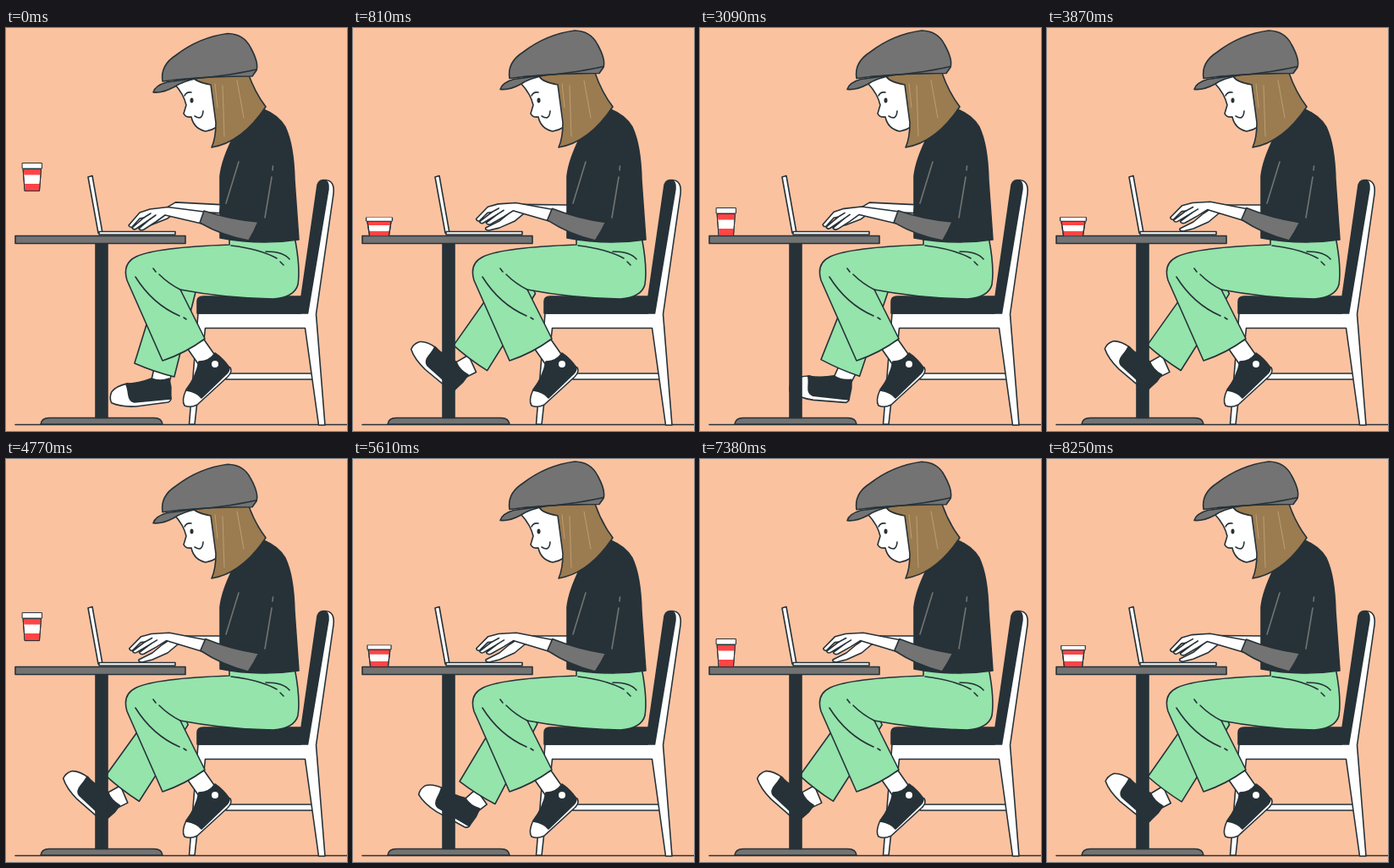
An HTML page that plays this animation: 403x476 px, repeating every 8280 ms.

```html
<!DOCTYPE html>
<html lang="en">
<head>
<meta charset="utf-8">
<title>Working at the laptop</title>
<style>
html,body{margin:0;width:100%;height:100%;overflow:hidden;background:#fbc2a0}
svg{display:block;width:100vw;height:100vh}
.ink{stroke:#263238;stroke-width:1.6;stroke-linejoin:round;stroke-linecap:round}
.thin{stroke-width:1}
.white{fill:#fff}.dark{fill:#263238}.grey{fill:#737373}.green{fill:#94e4ab}.hair{fill:#9b7b50}.red{fill:#ff4545}
.line{fill:none}.soft{fill:none;stroke:#737373}
</style>
</head>
<body>
<svg viewBox="0 0 403 476">
<rect width="403" height="476" fill="#fbc2a0"/>
<g class="ink">
  <path class="line" d="M11 468.500H403"/>

  <g id="chair">
    <path class="white" d="M261 408H362L363 415H260Z"/>
    <path class="white" d="M227 337L216.500 468H223L235.500 354.500H353.500L369.500 469H377L366.500 338L387 196Q389 180 377 179.500L348 337Z"/>
    <path class="dark" d="M367.500 189Q368 180 375 179.500Q382 180 381 190L356.500 337H226V323Q226 317 233 317H349Z"/>
  </g>

  <g id="shank">
    <g id="foot">
      <path class="white" d="M176 398L172 416L193 419L197 405Z"/>
      <path class="white" d="M144 420Q130 423 125 430Q122 437 125 443Q136 448 154 447L192 442Q196 440 195 436Z"/>
      <path class="dark" d="M142 420.500Q157 420 172 414Q182 418 193 414L195 424V438L152 442Q146 441 145 433Q144 425 142 420.500Z"/>
    </g>
    <path class="green" d="M181 302L152 396Q175 406 199 412L225 308Q210 290 181 302Z"/>
  </g>

  <g id="table">
    <path class="grey" d="M41 468Q42 460.500 51 460.500H175Q184 460.500 185 468Z"/>
    <path class="dark" d="M106 254H120V460.500H106Z"/>
    <path class="grey" d="M11 245.500H212V254.500H11Z"/>
  </g>

  <g id="frontLeg">
    <path class="white" d="M214 378L228 398L248 388L234 368Z"/>
    <path class="white" d="M228 394Q225 412 213 427Q207 440 211 446Q218 449 226 445L262 412Q268 406 265 401Z"/>
    <path class="dark" d="M229 394Q240 394 247 384Q256 390 264 401Q264 406 259 410L231 437Q226 430 213 428Q226 411 229 394Z"/>
    <circle cx="247" cy="397" r="4" fill="#fff" stroke="none"/>
    <path class="green" d="M264 250L341.500 249Q348 283 345 303Q341 318 316 320Q258 319 206 309L235 367Q212 384 185 393L143 298Q137 278 154 270Q178 259 264 256Z"/>
    <path class="line" d="M174 284L177 288M181 291Q192 302 206 309M153 294Q173 326 205 340M210 342L213 344M266 257Q300 261 320 272M307 264Q328 264 335 273M324 276L328 280"/>
  </g>

  <path class="dark" d="M304 96Q322 103 330 117Q340 138 341 180L346 250Q300 257 253 248V175Q255 156 269 128Z"/>
  <path class="soft" d="M275 158L260 207M315.500 163L315 168M314 176L306 224"/>

  <g id="laptop" class="white">
    <path d="M97 176L102 174.500L114 242H109Z"/>
    <path d="M110 240.500H200V244H110Z"/>
  </g>

  <g id="farArm">
    <path class="white" d="M253 209H200L185 219L173 229L157 237Q156 240 161 240L173 237L191 229L203 219L253 219Z"/>
  </g>
  <g id="nearArm">
    <path class="white" d="M234 217L191 211.500L170 214L158 218L145 233Q146 236 149 235L158 225L163 224L149 236Q151 239 154 237L170 226L157 237Q159 240 163 238L177 229L188 221L231 231Z"/>
    <path class="line" d="M163 224L171 219M170 226L177 221"/>
    <path class="grey" d="M234 216Q264 226 298 229Q293 241 287 251Q257 246 229 230Z"/>
  </g>

  <g id="head">
    <path class="white" d="M202 57L199 66Q210 78 213 91L210 101Q212 106 219 105Q222 119 236 122Q243 121 249 117L250 57Z"/>
    <ellipse cx="219.500" cy="85.500" rx="2" ry="2.900" class="dark" stroke="none"/>
    <path class="line" d="M211 80Q213 75 219 76M223 104Q232 110 233 98"/>
    <path class="hair" d="M220 57Q224 64 242 67L248 112Q248 130 243 141Q279 135 307 93Q294 76 286 53L220 55Z"/>
    <path d="M256 68L258 128M273 62L281 106M247 66L250 94" fill="none" stroke="#c4a981" stroke-width=".8"/>
  </g>
  <g id="cap">
    <path class="grey" d="M174 76Q176 68 190 64L228 59Q208 63 198 70Q185 77 174 76Z"/>
    <path class="grey" d="M185 63Q182 44 201 32Q228 11 262 6.500Q281 7 289 23Q299 41 296 50L291 57Q240 57 202 61Z"/>
    <path class="line" d="M202 61Q256 58 296 49"/>
  </g>
</g>
<g id="drops" fill="#7c2f17"></g>
<g id="cup" class="ink thin">
  <path class="white" d="M-10.500 -26H10.500L8.500 0H-8.500Z"/>
  <path class="red" stroke="none" d="M-10.200 -26H10.200L9.700 -19H-9.700ZM-9 -8.500H9L8.300 -.5H-8.300Z"/>
  <path class="line" d="M-10.500 -26H10.500L8.500 0H-8.500Z"/>
  <path class="white" d="M-11.500 -33H11.500V-26.500H-11.500Z"/>
</g>
</svg>
<script>
const LOOP = 8280;
const KNEE = '202 281', ANKLE = '184 410';
const $ = id => document.getElementById(id);
const place = (id, transform) => $(id).setAttribute('transform', transform);
const smooth = x => x * x * (3 - 2 * x);
const clamp = x => Math.max(0, Math.min(1, x));

// Eased value through [time, value] pairs.
function track(t, keys) {
  const i = keys.findIndex(k => k[0] > t);
  if (i < 0) return keys[keys.length - 1][1];
  if (i === 0) return keys[0][1];
  const [t0, v0] = keys[i - 1], [t1, v1] = keys[i];
  return v0 + (v1 - v0) * smooth((t - t0) / (t1 - t0));
}

const capKeys = [[180, 0], [720, 1], [1640, 1], [1960, 0]];
const squashKeys = [[420, 0], [800, 1], [860, 1], [1110, .65], [1350, 0],
  [3520, 0], [3880, 1], [4010, 1], [4250, 0]];

// Sideways reach and height of each coffee drop.
const drops = [[-26, 34], [-18, 41], [-10, 34], [-9, 23], [6, 47]].map(([dx, height], i) => {
  const node = document.createElementNS('http://www.w3.org/2000/svg', 'circle');
  node.setAttribute('r', i % 2 ? 1.2 : 1.5);
  $('drops').append(node);
  return { node, dx, height };
});

function swingLeg(t) {
  const phase = t % 3000;
  const fromRest = Math.min(phase, 3000 - phase) / 1500;
  const p = 1 - (1 - fromRest) ** 4.5;
  place('shank', `rotate(${18.6 * p} ${KNEE})`);
  place('foot', `translate(${-11 * p} ${6 * p}) rotate(${30 * p} ${ANKLE})`);
}

function type(t) {
  const wave = Math.cos((t - 30) / 450 * 2 * Math.PI);
  const lift = smooth(clamp(.6 - 1.3 * wave));
  place('nearArm', `rotate(${3.7 * lift} 288 240)`);
  place('farArm', `rotate(${3 * (1 - lift)} 260 214)`);
}

function bounceCup(t) {
  const phase = t % 4500;
  const squash = track(phase, squashKeys);
  let y = 0;
  if (phase < 420) y = -53 * (1 - (phase / 420) ** 2);
  if (phase > 4230) y = -53 * (1 - ((4500 - phase) / 270) ** 2);
  place('cup', `translate(31 ${245.5 + y}) scale(${1 + .34 * squash} ${1 - .34 * squash})`);

  const u = (phase - 1140) / 1090;
  const flying = u > 0 && u < 1;
  $('drops').style.display = flying ? '' : 'none';
  if (!flying) return;
  const arc = 4 * u * (1 - u);
  for (const { node, dx, height } of drops) {
    node.setAttribute('cx', 31 + dx * arc ** .3);
    node.setAttribute('cy', 213 - height * arc);
  }
}

function draw(t) {
  swingLeg(t);
  type(t);
  bounceCup(t);
  place('cap', `translate(0 ${-3.5 * track(t % 2250, capKeys)})`);
}

const start = performance.now();
function tick() {
  draw((performance.now() - start) % LOOP);
  requestAnimationFrame(tick);
}
draw(0);
requestAnimationFrame(tick);
</script>
</body>
</html>
```
